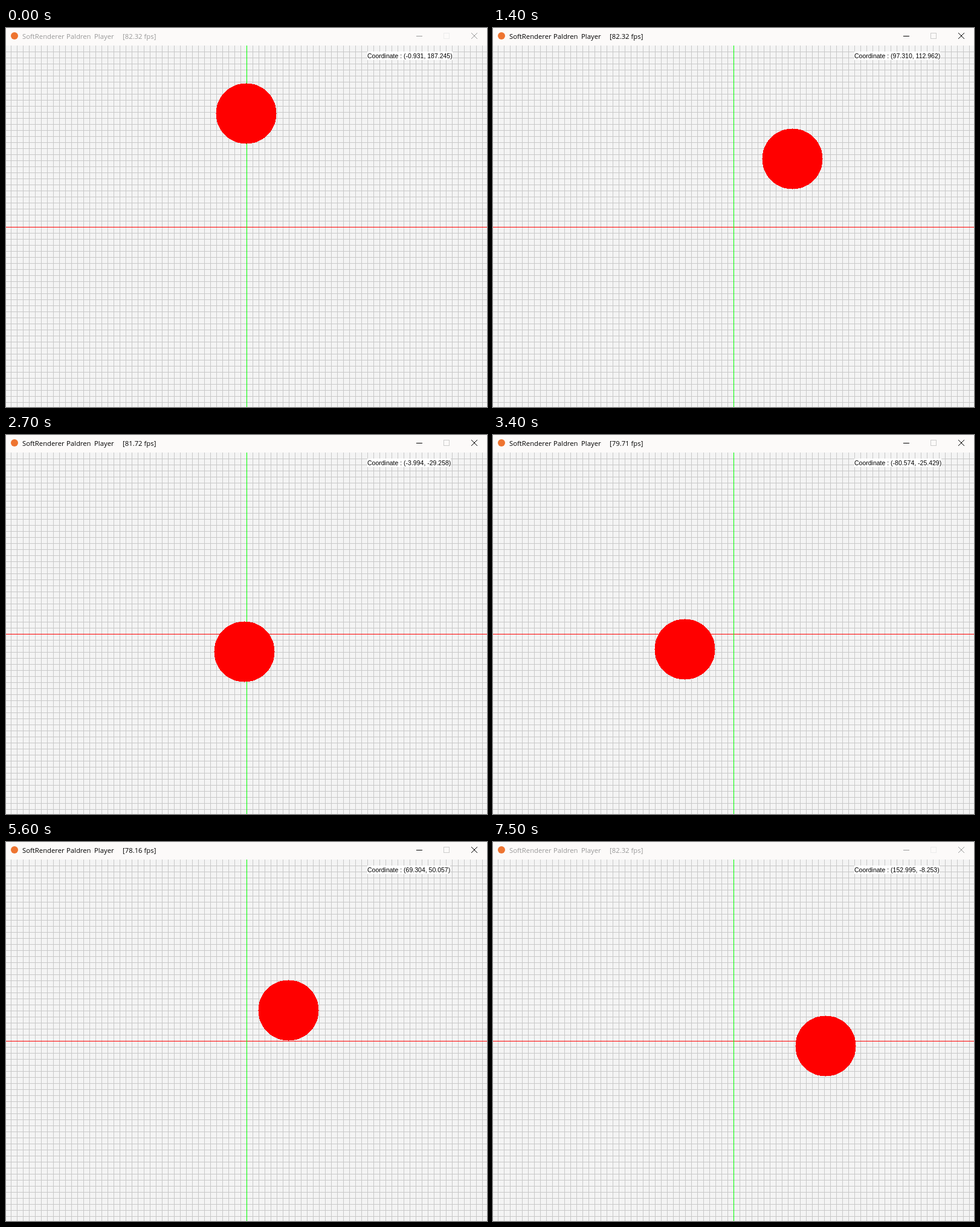
Animation, 796 px wide and 627 px high, one loop 7600 ms. Source, as an HTML page with a canvas:

```html
<!DOCTYPE html>
<html lang="en">
<head>
<meta charset="utf-8">
<title>SoftRenderer</title>
<style>
  html, body { margin: 0; width: 100%; height: 100%; overflow: hidden; background: #f4f4f4; }
  canvas { display: block; }
</style>
</head>
<body>
<canvas id="stage" width="796" height="627"></canvas>
<script>
const W = 796, H = 627, LOOP = 7600, STEP = 100;
const BAR = 29, OX = 398, OY = 329, CELL = 10, RADIUS = 50;
const SPEED = 0.1094; // px per ms while a key is held
const ctx = document.getElementById('stage').getContext('2d');

const clamp = (v, lo, hi) => Math.min(Math.max(v, lo), hi);

// How far the ball has gone with a key held between two times.
const held = (t, from, to) => SPEED * (clamp(t, from, to) - from);

function ballAt(t) {
  const right = held(t, 488, 1386) + held(t, 3915, 6365);
  const left = held(t, 1774, 3715);
  const up = held(t, 3134, 4379) + held(t, 4720, 4962);
  const down = held(t, 721, 2931) + held(t, 5069, 5953) + held(t, 6400, 6580);
  return { x: -0.931 + right - left, y: 187.245 + up - down };
}

// The frame rate sways more and more while the ball moves, then settles.
function fpsAt(t) {
  const s = clamp((t - 600) / 6000, 0, 1);
  return 82.32 + 6.5 * s * (1 - s ** 8) * Math.cos(5 * Math.PI * (s - 0.233));
}

function rect(color, x, y, w, h) {
  ctx.fillStyle = color;
  ctx.fillRect(x, y, w, h);
}

function text(str, x, y, font, color) {
  ctx.font = font;
  ctx.fillStyle = color;
  ctx.fillText(str, x, y);
}

function drawTitleBar(fps, active) {
  const ink = active ? '#000' : '#999';
  const font = '11.3px "Open Sans", "Noto Sans", sans-serif';
  rect('#fcfaf9', 0, 0, W, BAR);

  ctx.fillStyle = '#ee7430';
  ctx.beginPath();
  ctx.arc(14, 13, 6, 0, Math.PI * 2);
  ctx.fill();

  text('SoftRenderer', 27, 18, font, ink);
  text('Paldren', 100, 18, font, ink);
  text('Player', 146, 18, font, ink);
  text(`[${fps.toFixed(2)} fps]`, 193, 18, font, ink);

  rect(ink, 679, 13, 10, 1);
  ctx.lineWidth = 1;
  ctx.strokeStyle = active ? '#ccc' : '#ececec';
  ctx.strokeRect(724.5, 8.5, 9, 9);
  ctx.strokeStyle = ink;
  ctx.beginPath();
  ctx.moveTo(770, 8);
  ctx.lineTo(780, 18);
  ctx.moveTo(780, 8);
  ctx.lineTo(770, 18);
  ctx.stroke();
}

function drawGrid() {
  rect('#f4f4f4', 0, BAR, W, H - BAR);
  for (let x = OX % CELL; x < W; x += CELL) rect('#c8c8c8', x, BAR, 1, H - BAR);
  for (let y = BAR + CELL; y < H; y += CELL) rect('#c8c8c8', 0, y, W, 1);
  rect('#f00', 0, OY, W, 1);
  rect('#0f0', OX, BAR, 1, H - BAR);
}

// Row by row, so the edge stays hard.
function drawBall({ x, y }) {
  const cx = Math.floor(OX + x), cy = Math.floor(OY - y);
  for (let dy = -RADIUS; dy <= RADIUS; dy++) {
    const half = Math.floor(Math.sqrt(RADIUS * RADIUS - dy * dy));
    rect('#f00', cx - half, cy + dy, 2 * half + 1, 1);
  }
}

function drawReadout({ x, y }) {
  const font = '10.5px "Liberation Sans", Arial, sans-serif';
  const label = `Coordinate : (${x.toFixed(3)}, ${y.toFixed(3)})`;
  ctx.font = font;
  rect('#fff', 598, 39, Math.round(ctx.measureText(label).width), 14);
  text(label, 598, 50, font, '#000');
}

function draw(now) {
  const t = Math.floor((now % LOOP) / STEP) * STEP;
  const ball = ballAt(t);
  drawGrid();
  drawBall(ball);
  drawReadout(ball);
  drawTitleBar(fpsAt(t), t >= 200 && t < 7400);
}

const start = performance.now();
function loop() {
  draw(performance.now() - start);
  requestAnimationFrame(loop);
}
loop();
</script>
</body>
</html>
```
